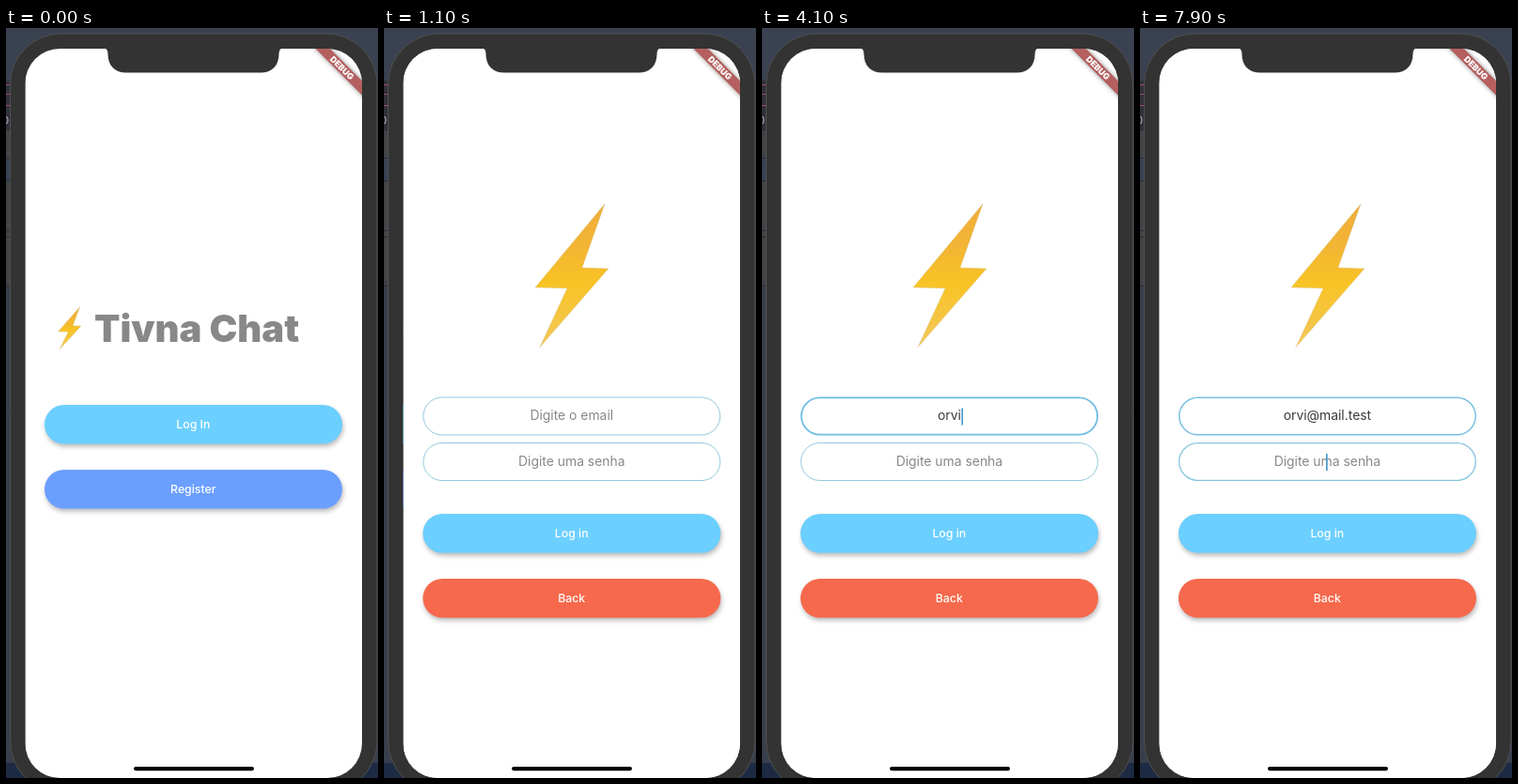
These frames come from a looping animation (396x798 px, 8 s). An HTML page with a canvas:

```html
<!DOCTYPE html>
<html lang="en">
<head>
<meta charset="utf-8">
<title>Chat login</title>
<style>
html, body { margin: 0; width: 100%; height: 100%; overflow: hidden; background: #333; }
canvas { display: block; width: 396px; height: 798px; }
</style>
</head>
<body>
<canvas id="stage" width="396" height="798"></canvas>
<script>
const ctx = document.getElementById('stage').getContext('2d');
const LOOP = 8000, STEP = 100;
const SCREEN = { x: 20.4, y: 22, w: 358.6, h: 776, r: 37 };
const PUSH = { start: 851, length: 255 };
const FOCUS_EMAIL = 2120, FOCUS_PASSWORD = 7830;
const EMAIL = 'orvi@mail.test';
const KEY_TIMES = [3600, 3700, 3800, 3850, 5100, 5300, 5500, 5600, 5800, 6100, 6300, 6450, 6600, 6700];

const clamp = v => Math.min(1, Math.max(0, v));
const lerp = (a, b, k) => a + (b - a) * k;
const ramp = (t, start, length) => clamp((t - start) / length);

function bezier(x1, y1, x2, y2) {
  const axis = (a, b, s) => 3 * a * s * (1 - s) ** 2 + 3 * b * s * s * (1 - s) + s ** 3;
  return x => {
    if (x <= 0 || x >= 1) return clamp(x);
    let lo = 0, hi = 1;
    for (let i = 0; i < 24; i++) {
      const mid = (lo + hi) / 2;
      if (axis(x1, x2, mid) < x) lo = mid; else hi = mid;
    }
    return axis(y1, y2, lo);
  };
}
const slide = bezier(0.35, 0.91, 0.33, 0.97);
const flight = bezier(0.4, 0, 0.2, 1);

function rect(x, y, w, h, color) {
  ctx.fillStyle = color;
  ctx.fillRect(x, y, w, h);
}

function rounded(x, y, w, h, r) {
  ctx.beginPath();
  ctx.roundRect(x, y, w, h, r);
}

function label(text, x, y, font, color, align = 'center') {
  ctx.font = font + ' Inter, Roboto, sans-serif';
  ctx.textAlign = align;
  ctx.fillStyle = color;
  ctx.fillText(text, x, y);
}

function backdrop() {
  rect(0, 0, 396, 798, '#383e4c');
  rect(0, 0, 396, 56, '#3a4252');
  rect(0, 56, 6, 52, '#30323c');
  for (const y of [60, 70, 82]) rect(0, y, 5, 1, '#a84a68');
  label('0', 0, 102, '10px', '#c8c8c8');
  rect(0, 108, 6, 167, '#434447');
  for (const y of [108, 138, 162, 215, 222, 274]) rect(0, y, 6, 1, '#2b2c31');
  rect(0, 139, 6, 23, '#384254');
  rect(0, 782, 396, 16, '#1d2a44');
}

function bezel() {
  rounded(4.5, 6, 390.5, 807, 54);
  ctx.fillStyle = '#333';
  ctx.fill();
  ctx.strokeStyle = '#505050';
  ctx.lineWidth = 1;
  ctx.stroke();
}

function notch() {
  const top = SCREEN.y - 1, bottom = 47.5;
  ctx.beginPath();
  ctx.moveTo(103, top);
  ctx.quadraticCurveTo(108.5, top, 108.5, 28);
  ctx.bezierCurveTo(108.5, 40, 116, bottom, 128, bottom);
  ctx.lineTo(271, bottom);
  ctx.bezierCurveTo(283, bottom, 290.5, 40, 290.5, 28);
  ctx.quadraticCurveTo(290.5, top, 296, top);
  ctx.closePath();
  ctx.fillStyle = '#333';
  ctx.fill();
}

function banner() {
  ctx.save();
  ctx.translate(357.7, 42.5);
  ctx.rotate(Math.PI / 4);
  ctx.shadowColor = 'rgba(0,0,0,.45)';
  ctx.shadowBlur = 5;
  rect(-50, -5.4, 100, 10.8, '#b55f5f');
  ctx.shadowColor = 'transparent';
  label('DEBUG', 0, 3.2, '900 9px', '#fff');
  ctx.restore();
}

function button(text, y, color, ripple) {
  ctx.save();
  ctx.shadowColor = 'rgba(0,0,0,.27)';
  ctx.shadowBlur = 5;
  ctx.shadowOffsetX = 1;
  ctx.shadowOffsetY = 3;
  rounded(41, y, 317, 41.5, 20.75);
  ctx.fillStyle = color;
  ctx.fill();
  ctx.restore();
  if (ripple) {
    ctx.save();
    rounded(41, y, 317, 41.5, 20.75);
    ctx.clip();
    rect(41, y, 317, 42, `rgba(188,188,188,${ripple.highlight})`);
    ctx.beginPath();
    ctx.arc(255, y + 31, ripple.radius, 0, 7);
    ctx.fillStyle = `rgba(200,200,200,${ripple.alpha})`;
    ctx.fill();
    ctx.restore();
  }
  label(text, 199.3, y + 25, '500 12.3px', '#fff');
}

function bolt(left, top, w, h) {
  const points = [[.95, 0], [.64, .445], [1, .451], [.06, 1], [.436, .588], [0, .582]];
  const fill = ctx.createLinearGradient(0, top, 0, top + h);
  fill.addColorStop(0, '#f0ad3c');
  fill.addColorStop(.3, '#f3b534');
  fill.addColorStop(.55, '#f8c324');
  fill.addColorStop(1, '#f3c75c');
  ctx.beginPath();
  for (const [x, y] of points) ctx.lineTo(left + x * w, top + y * h);
  ctx.closePath();
  ctx.fillStyle = fill;
  ctx.fill();
  ctx.strokeStyle = 'rgba(200,190,150,.45)';
  ctx.lineWidth = .7;
  ctx.stroke();
}

// The bolt sets off sideways, then rises and grows along an arc.
function heroBolt(k) {
  const rise = k * k;
  const width = lerp(24.5, 78, rise), height = lerp(45.5, 153, rise);
  bolt(lerp(80, 239, k) - width, lerp(296.5, 187, rise), width, height);
}

function pressRipple(t) {
  if (t < 500 || t > 1200) return null;
  return {
    radius: lerp(12, 105, ramp(t, 500, 400)),
    alpha: .3 * ramp(t, 500, 100) * (1 - ramp(t, 900, 250)),
    highlight: .18 * ramp(t, 600, 100) * (1 - ramp(t, 730, 170))
  };
}

function welcomePage(t) {
  label('Tivna Chat', 94, 334, '900 40px', '#888', 'left');
  button('Log In', 401, '#6bcfff', pressRipple(t));
  button('Register', 470, '#6b9fff');
}

function caretAlpha(t, since) {
  const phase = (t - since) % 1000;
  const ease = k => 1 - (1 - k) ** 2;
  if (phase >= 500) return 1 - ease(ramp(phase, 500, 250));
  return t - since < 500 ? 1 : ease(ramp(phase, 0, 250));
}

function field(y, hint, value, focus, caret) {
  const inset = .5 + focus * .4;
  rounded(41 + inset, y + inset, 317 - 2 * inset, 41 - 2 * inset, 20.5 - inset);
  ctx.strokeStyle = `rgb(${lerp(147, 110, focus)},${lerp(200, 188, focus)},${lerp(222, 226, focus)})`;
  ctx.lineWidth = 1 + focus * .8;
  ctx.stroke();
  label(value || hint, 199.4, y + 24.7, '13.9px', value ? '#3a3a3a' : '#888');
  if (caret > 0) {
    const x = value ? 199.4 + ctx.measureText(value).width / 2 + .4 : 198;
    ctx.globalAlpha = caret;
    rect(x, y + 12, 1.7, 18, '#4c9cd0');
    ctx.globalAlpha = 1;
  }
}

function loginPage(t) {
  const typed = KEY_TIMES.filter(key => key <= t).length;
  const onEmail = t >= FOCUS_EMAIL && t < FOCUS_PASSWORD;
  const lastEvent = typed ? KEY_TIMES[typed - 1] : FOCUS_EMAIL;
  const passwordFocus = ramp(t, FOCUS_PASSWORD, 200);
  const emailFocus = ramp(t, FOCUS_EMAIL, 160) - passwordFocus;
  field(392.5, 'Digite o email', EMAIL.slice(0, typed), emailFocus, onEmail ? caretAlpha(t, lastEvent) : 0);
  field(441, 'Digite uma senha', '', passwordFocus, t >= FOCUS_PASSWORD ? 1 : 0);
  button('Log in', 517, '#6bcfff');
  button('Back', 586, '#f6694c');
}

function screen(t) {
  const progress = ramp(t, PUSH.start, PUSH.length);
  const shift = slide(progress);
  const offset = SCREEN.w * (1 - shift);
  ctx.save();
  rounded(SCREEN.x, SCREEN.y, SCREEN.w, SCREEN.h, SCREEN.r);
  ctx.clip();
  rect(SCREEN.x, SCREEN.y, SCREEN.w, SCREEN.h, '#fff');
  if (progress < 1) {
    ctx.save();
    ctx.translate(-SCREEN.w * shift / 3, 0);
    welcomePage(t);
    ctx.restore();
  }
  if (progress > 0) {
    ctx.save();
    ctx.translate(offset, 0);
    if (progress < 1) {
      const shade = ctx.createLinearGradient(SCREEN.x - 7, 0, SCREEN.x, 0);
      shade.addColorStop(0, 'rgba(0,0,0,0)');
      shade.addColorStop(.5, 'rgba(0,0,0,.06)');
      shade.addColorStop(1, 'rgba(0,0,0,.08)');
      rect(SCREEN.x - 7, SCREEN.y, 7, SCREEN.h, shade);
    }
    rect(SCREEN.x, SCREEN.y, SCREEN.w, SCREEN.h, '#fff');
    loginPage(t);
    ctx.restore();
  }
  heroBolt(flight(progress));
  banner();
  ctx.restore();
}

function draw(t) {
  backdrop();
  bezel();
  screen(t);
  notch();
  rounded(136, 786, 128, 4.2, 2.1);
  ctx.fillStyle = '#000';
  ctx.fill();
}

const began = performance.now();
function tick() {
  const elapsed = (performance.now() - began) % LOOP;
  draw(Math.floor(elapsed / STEP) * STEP);
  requestAnimationFrame(tick);
}
tick();
</script>
</body>
</html>
```
